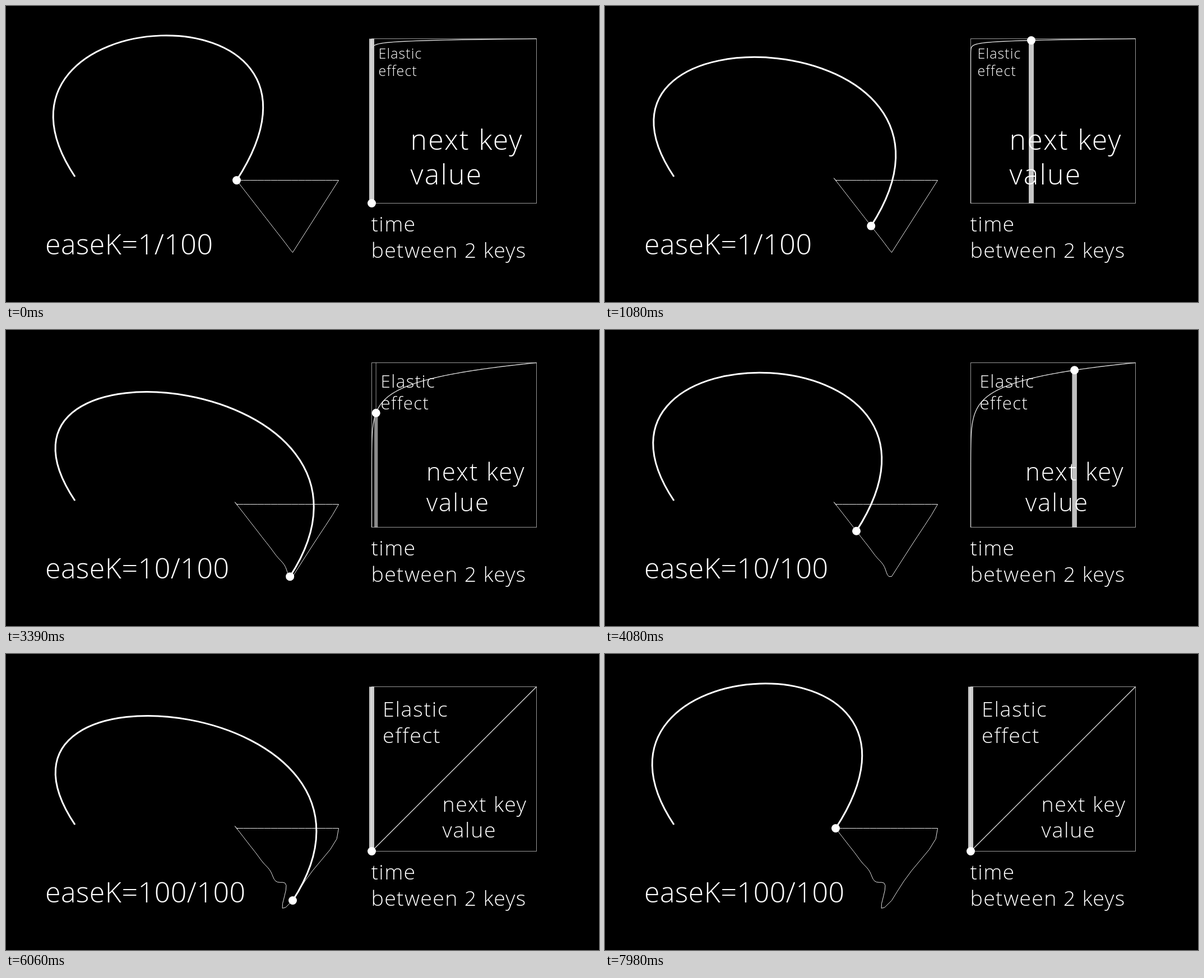
An HTML page with a canvas that plays this animation: 1058x529 px, repeating every 8000 ms.

```html
<!DOCTYPE html>
<html lang="en">
<head>
<meta charset="utf-8">
<title>Elastic key easing</title>
<style>
  html, body { margin: 0; width: 100%; height: 100%; overflow: hidden; background: #000; }
  canvas { display: block; }
</style>
</head>
<body>
<canvas id="stage" width="1058" height="529"></canvas>
<script>
const ctx = document.getElementById('stage').getContext('2d');

const LOOP = 8000, STEP = 30, CYCLE = 90;
const GRAPH = { x: 652.5, y: 58.5, size: 294 };

// Keys and the legs between them; "rate" is the progress made per step.
const TL = [411.5, 311.5], TR = [593.5, 311.5], LOW = [511.5, 440.5];
const LEGS = [
  { start: 0,  from: TL,  to: TR,  rate: 0.0671 },
  { start: 15, from: TR,  to: LOW, rate: 0.1465 },
  { start: 22, from: LOW, to: TL,  rate: 0.02624 },
  { start: 61, from: TL,  to: TL,  rate: 0 }
];

const PHASES = [
  { k: 1,   elastic: [664.5, 94, 25],     next: [721.5, 256.5, 50] },
  { k: 10,  elastic: [668.5, 103, 31.3],  next: [750, 269, 43.9] },
  { k: 100, elastic: [672, 112, 37.6],    next: [778.5, 281.5, 37.6] }
];

// Damped swing that carries the speed of the previous leg past its key.
const swing = n => 1.7 * Math.sin(Math.PI * n / 4.8) * Math.exp(-0.17 * n);

function poseAt(step, ease) {
  const index = LEGS.findLastIndex(leg => step >= leg.start);
  const leg = LEGS[index];
  const before = LEGS[(index + 3) % 4];
  const n = step - leg.start;
  const time = n * leg.rate;
  const value = Math.pow(time, ease);
  const pull = swing(n) * before.rate * Math.pow(Math.max(0, 1 - value), 1.3);
  const along = axis => leg.from[axis] + (leg.to[axis] - leg.from[axis]) * time
    + (before.to[axis] - before.from[axis]) * pull;
  return { time, value, x: along(0), y: along(1) };
}

function strokePath(points, color, width) {
  ctx.beginPath();
  points.forEach(([x, y]) => ctx.lineTo(x, y));
  ctx.strokeStyle = color;
  ctx.lineWidth = width;
  ctx.stroke();
}

function dot(x, y) {
  ctx.beginPath();
  ctx.arc(x, y, 7.5, 0, Math.PI * 2);
  ctx.fillStyle = '#fff';
  ctx.fill();
}

function label(lines, [x, y, size], tracking = 0.045) {
  ctx.font = `300 ${size}px "Open Sans", "Noto Sans", sans-serif`;
  ctx.letterSpacing = `${size * tracking}px`;
  ctx.fillStyle = '#fff';
  lines.forEach((line, i) => ctx.fillText(line, x, y + i * size * 1.245));
}

function bar(x, top, bottom, amount) {
  const width = 9 * amount;
  ctx.fillStyle = `rgba(255,255,255,${0.79 * amount})`;
  ctx.fillRect(x - width / 2, top, width, bottom - top);
}

function drawGraph(pose, ease) {
  const { x, y, size } = GRAPH;
  const bottom = y + size;
  const px = x + size * pose.time;
  const py = bottom - size * pose.value;

  ctx.strokeStyle = '#999';
  ctx.lineWidth = 1;
  ctx.strokeRect(x, y, size, size);

  bar(px, y, py, 1 - pose.value);
  bar(px, py, bottom, pose.value);

  const curve = Array.from({ length: 501 }, (_, i) => {
    const v = i / 500;
    return [x + size * Math.pow(v, 1 / ease), bottom - size * v];
  });
  strokePath(curve, '#d8d8d8', 1.4);
  dot(px, py);
}

function drawScene(pose, ease) {
  const trail = Array.from({ length: CYCLE + 1 }, (_, i) => {
    const p = poseAt(i % CYCLE, ease);
    return [p.x, p.y];
  });
  strokePath(trail, '#e6e6e6', 1);

  ctx.beginPath();
  ctx.moveTo(123, 305);
  ctx.bezierCurveTo(-89, -12, pose.x + 236, pose.y - 364, pose.x, pose.y);
  ctx.strokeStyle = '#fff';
  ctx.lineWidth = 3;
  ctx.stroke();
  dot(pose.x, pose.y);
}

function draw(ms) {
  const step = Math.floor((ms % LOOP) / STEP);
  const phase = PHASES[Math.min(2, Math.floor(step / CYCLE))];
  const ease = phase.k / 100;
  const pose = poseAt(step % CYCLE, ease);

  ctx.fillStyle = '#000';
  ctx.fillRect(0, 0, 1058, 529);
  drawScene(pose, ease);
  drawGraph(pose, ease);

  label(['Elastic', 'effect'], phase.elastic);
  label(['next key', 'value'], phase.next);
  label(['time', 'between 2 keys'], [651.5, 403, 37.6], 0.034);
  label([`easeK=${phase.k}/100`], [70, 443.5, 50], 0.011);
}

let origin;
function tick(now) {
  origin ??= now;
  draw(now - origin);
  requestAnimationFrame(tick);
}
draw(0);
requestAnimationFrame(tick);
</script>
</body>
</html>
```
